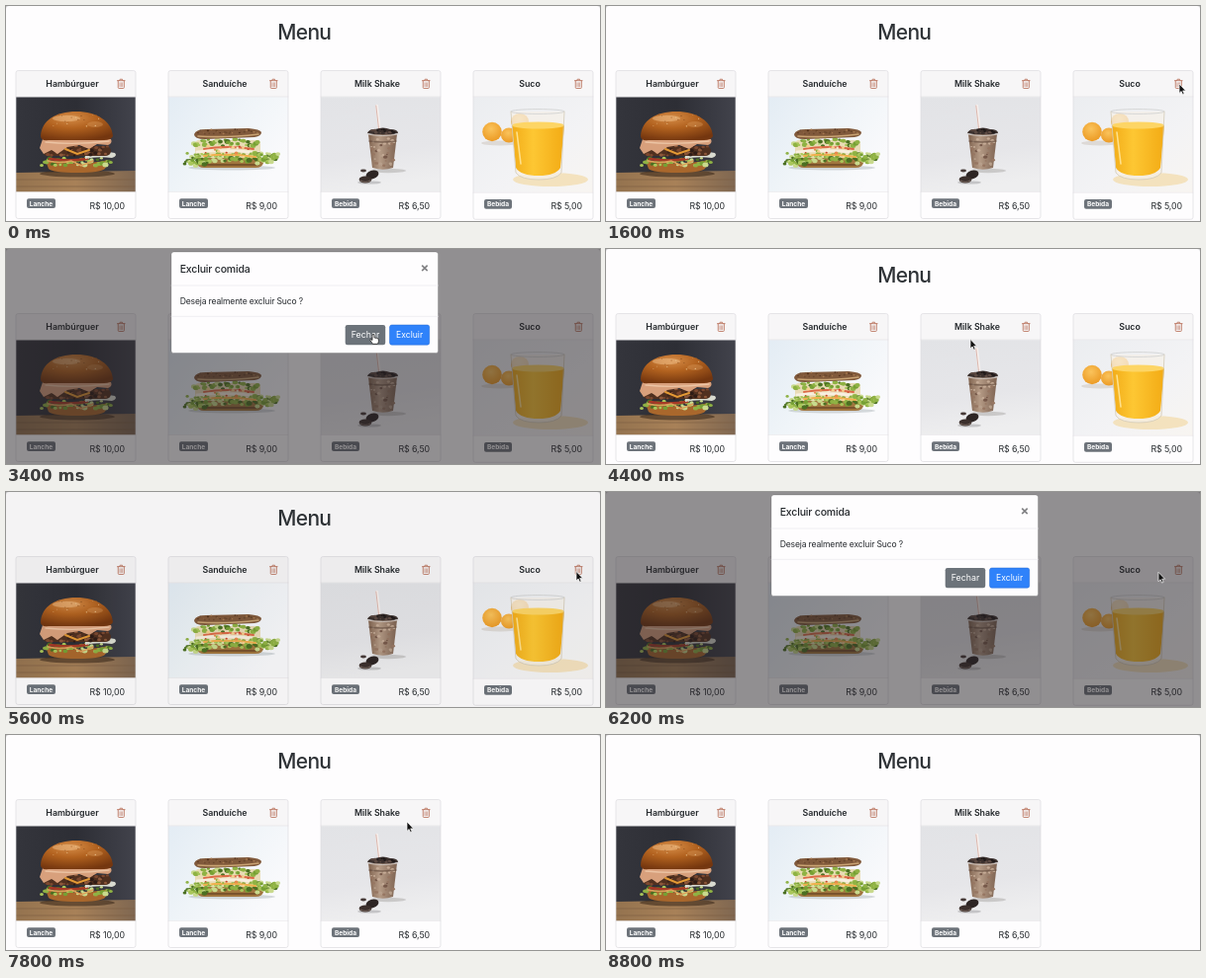
Write an HTML page that moves like this. It is 600 px wide and 218 px high and loops after 9000 ms.

```html
<!DOCTYPE html>
<html lang="pt">
<head>
<meta charset="utf-8">
<title>Menu</title>
<style>
html, body { margin: 0; width: 100%; height: 100%; overflow: hidden; background: #fefdfe; }
svg { display: block; }
#stage { width: 600px; height: 218px; font-family: Inter, "Open Sans", sans-serif; }
</style>
</head>
<body>
<svg id="stage" viewBox="0 0 600 218">
  <defs>
    <filter id="soft" x="-5%" y="-5%" width="110%" height="110%"><feGaussianBlur stdDeviation=".65"/></filter>
    <linearGradient id="wall" x2="1"><stop stop-color="#34353c"/><stop offset=".5" stop-color="#2d2e35"/><stop offset="1" stop-color="#42434c"/></linearGradient>
    <linearGradient id="wood" x2="1"><stop stop-color="#94734f"/><stop offset=".5" stop-color="#a88158"/><stop offset="1" stop-color="#7f6751"/></linearGradient>
    <radialGradient id="bun" cx=".42" cy=".22" r=".8"><stop stop-color="#d58c48"/><stop offset=".45" stop-color="#b2621f"/><stop offset="1" stop-color="#74360f"/></radialGradient>
    <linearGradient id="sky" x2="1" y2=".6"><stop stop-color="#e3ecf4"/><stop offset=".5" stop-color="#eff4f8"/><stop offset="1" stop-color="#fafafc"/></linearGradient>
    <linearGradient id="grey" y2="1" x2=".2"><stop stop-color="#e2e3e6"/><stop offset=".65" stop-color="#e6e6e9"/><stop offset="1" stop-color="#eeeeef"/></linearGradient>
    <linearGradient id="shake" x2="1"><stop stop-color="#80634f"/><stop offset=".4" stop-color="#b49a85"/><stop offset="1" stop-color="#7d6251"/></linearGradient>
    <linearGradient id="pale" y2="1"><stop stop-color="#ebedf0"/><stop offset=".6" stop-color="#f3f3f5"/><stop offset="1" stop-color="#f8f5f1"/></linearGradient>
    <linearGradient id="juice" x2="1"><stop stop-color="#f2ac18"/><stop offset=".4" stop-color="#fdc733"/><stop offset="1" stop-color="#f3ab15"/></linearGradient>
    <radialGradient id="orange" cx=".45" cy=".35" r=".75"><stop stop-color="#fac35c"/><stop offset="1" stop-color="#ea951c"/></radialGradient>
  </defs>
  <rect width="600" height="218" fill="#fefdfe"/>
  <path d="M0 0H3Q0 0 0 3ZM600 0H597Q600 0 600 3Z" fill="#c9c9cc"/>
  <g id="page"></g>
  <rect id="shade" width="600" height="218" fill="#262226"/>
  <g id="modal"></g>
  <g id="cursor" stroke-linejoin="round">
    <path id="arrow" d="M0 0V9.4L2.1 7.5 3.6 10.8 5.1 10.1 3.7 6.9H6.6Z" fill="#111" stroke="#fff" stroke-width=".7"/>
    <path id="hand" d="M-1 .6Q0-.6 1 .6V3.6Q2 3 2.7 3.9 3.7 3.4 4.3 4.3 5.4 4 5.4 5.2V7.2Q5.2 8.6 4.4 9.8H-.6Q-1.6 8-3 6.2-3.4 4.8-2.2 5L-1 6Z" fill="#fff" stroke="#222" stroke-width=".8"/>
  </g>
</svg>
<script>
const $ = id => document.getElementById(id);
const LOOP = 9000;

let seed = 7;
const rnd = () => (seed = seed * 16807 % 2147483647) / 2147483647;

const shape = (d, fill, more = '') => `<path d="${d}" fill="${fill}" ${more}/>`;
const line = (d, color, width, more = '') =>
  shape(d, 'none', `stroke="${color}" stroke-width="${width}" stroke-linecap="round" ${more}`);
const rect = (x, y, w, h, fill, more = '') =>
  `<rect x="${x}" y="${y}" width="${w}" height="${h}" fill="${fill}" ${more}/>`;
const oval = (x, y, rx, ry, fill, more = '') =>
  `<ellipse cx="${x}" cy="${y}" rx="${rx}" ry="${ry}" fill="${fill}" ${more}/>`;
const text = (s, x, y, size, fill, more = '') =>
  `<text x="${x}" y="${y}" font-size="${size}" fill="${fill}" ${more}>${s}</text>`;

// Scattered soft crumbs or leaves inside a box
function bits(n, x, y, w, h, r, colors) {
  let out = '';
  for (let i = 0; i < n; i++) {
    const px = x + w * (i + rnd()) / n, py = y + h * rnd(), k = r * (.6 + rnd() * .7);
    const color = colors[Math.floor(rnd() * colors.length)];
    out += oval(px.toFixed(1), py.toFixed(1), (k * 1.25).toFixed(1), k.toFixed(1), color);
  }
  return out;
}

const greens = ['#76a034', '#a9c65a', '#4b6f22', '#8fb244', '#c8d98c'];

const burger = () =>
  rect(10, 92, 122, 98, 'url(#wall)') +
  shape('M10 169 131 167V190H10Z', 'url(#wood)') +
  line('M10 176H131M10 183H131', '#7a5d42', .6) +
  oval(72, 170, 38, 3.5, '#3d2a1c', 'opacity=".6"') +
  shape('M40 157Q70 163 104 156L100 165Q95 169 72 169 47 169 43 165Z', '#a9672c') +
  bits(40, 36, 154, 70, 8, 1.9, greens) +
  line('M44 155Q62 158 82 155', '#a83a26', 2.6) +
  shape('M80 150Q96 146 110 149 113 152 107 154 92 152 80 155Z', '#d9dbd0') +
  rect(37, 142, 69, 10, '#50301f', 'rx="5"') +
  bits(40, 38, 141, 66, 11, 1.4, ['#7d4930', '#38211a', '#8d583a', '#2f1c16']) +
  shape('M37 135H106Q108 139 103 141L92 140 84 145 74 141 62 143 52 150 46 146 38 150 34 144Z', '#d8a07c') +
  line('M40 138Q70 141 104 137', '#ecc4a4', 1.3) +
  line('M60 145 72 150 84 146', '#e49a35', 2) +
  line('M42 157Q56 160 66 157L76 162 88 157', '#dca05a', 1.5) +
  shape('M35 132C36 116 50 107 71 107S107 117 108 132Q106 136 99 136H43Q35 137 35 132Z', 'url(#bun)') +
  oval(61, 114, 14, 3.2, '#f0c08a', 'opacity=".5"') +
  oval(90, 120, 8, 3, '#d99a5c', 'opacity=".4"') +
  bits(18, 46, 110, 50, 13, .5, ['#e8bd87', '#9c5a24']);

const sandwich = () =>
  rect(163, 92, 122, 98, 'url(#sky)') +
  oval(228, 164, 44, 2.5, '#b7bdc2', 'opacity=".55"') +
  shape('M192 154H258L260 159Q259 164 252 164H200Q194 164 192 159Z', '#a1763f') +
  line('M198 161H255', '#6e4826', 1.5) +
  rect(191, 136, 66, 18, '#e9dcb6', 'rx="4"') +
  bits(54, 183, 149, 90, 10, 1.9, greens) +
  bits(34, 189, 135, 66, 7, 1.8, greens) +
  line('M200 145Q222 141 250 145', '#dc6a48', 1.9) +
  line('M193 148Q222 145 256 149', '#f8efe0', 2.8) +
  line('M200 152Q226 149 252 153', '#f0b04e', 2) +
  bits(26, 198, 142, 54, 12, 1.2, ['#e78a4d', '#f7ead2', '#c8432b', '#f5d08c', '#8fb244']) +
  bits(20, 180, 153, 24, 9, 1.8, greens) +
  bits(22, 250, 149, 25, 11, 1.8, greens) +
  shape('M190 130Q192 125 202 125L245 124Q257 125 258 128 258 132 251 133L201 135Q190 135 190 130Z', '#80593b') +
  line('M194 132Q222 134 255 130', '#c8a272', 1.6) +
  bits(28, 194, 125, 60, 5, .7, ['#54351f', '#a77b50', '#69482d']);

const shake = () =>
  rect(317, 92, 122, 98, 'url(#grey)') +
  oval(386, 167, 18, 2.2, '#a9a7a6', 'opacity=".5"') +
  line('M374.5 101 377.5 127', '#f7f1ee', 2.6) +
  line('M373.8 101 376.8 127', '#d6a79c', .8) +
  shape('M366 130H395L391 164Q381 167.5 370 164Z', 'url(#shake)') +
  bits(34, 369, 134, 23, 28, 1.3, ['#77594a', '#c5ab96', '#967662', '#b8a08c']) +
  line('M367 137Q381 139 394 137', '#5f473a', 1.4, 'opacity=".6"') +
  shape('M365 129Q366 125 373 125 381 122 388 125 396 125 396 129 381 132 365 129Z', '#3b302d') +
  bits(14, 368, 125, 25, 4, 1.1, ['#201a1a', '#5d4a43']) +
  line('M365 130Q381 133 396 130', '#d3cac4', .9) +
  oval(367, 179, 12, 1.6, '#9b9b9d', 'opacity=".5"') +
  oval(370, 171, 6.6, 4.2, '#2d2524', 'transform="rotate(-18 370 171)"') +
  oval(363, 176, 6.4, 3.4, '#3c302d') +
  oval(361, 167, 3, 1.4, '#463936') +
  line('M358 177Q363 180 368 177', '#89786d', .8);

const juice = () =>
  rect(471, 92, 122, 99, 'url(#pale)') +
  oval(499, 139, 19, 2.6, '#d6d1cb', 'opacity=".7"') +
  oval(519, 117, 9, 8, 'url(#orange)') +
  oval(508, 131, 8, 7.5, 'url(#orange)') +
  oval(491, 127.5, 9.8, 9.7, 'url(#orange)') +
  oval(550, 176, 38, 7, '#f3dcac', 'opacity=".75"') +
  shape('M510 107H564L561 169Q556 176 538 176 520 176 515 169Z', '#f6f1e8', 'opacity=".75"') +
  shape('M511 121H564L560 164Q555 172 538 172 520 172 515 164Z', 'url(#juice)') +
  oval(537.5, 121, 26.3, 3.6, '#fdd565') +
  line('M516 128 520 160', '#ffe08a', 1.6) +
  oval(537, 107, 27, 2.4, 'none', 'stroke="#cfd0d0" stroke-width=".8"') +
  line('M510 107 515 169Q520 176 538 176T561 169L564 107', '#d3cbb6', .8);

const trash = (x, y) => `<g transform="translate(${x} ${y}) scale(.95)" fill="none" stroke="#b9705a" stroke-width=".9" stroke-linecap="round">
  <path d="M-4-3.3H4M-1.7-3.5-1.2-4.8H1.2L1.7-3.5M-3.2-3V4Q-3.2 4.9-2.3 4.9H2.3Q3.2 4.9 3.2 4V-3"/>
  <path d="M-1.4-1V3M0-1V3M1.4-1V3" stroke-width=".6"/></g>`;

function card(x, name, tag, price, draw, drop = 0) {
  const bottom = 188.5 + drop;
  return `<g id="card${x}">` +
    rect(x, 65.5, 121, 150 + drop, '#fefdfe', 'rx="2.2"') +
    shape(`M${x} 92V67.7Q${x} 65.5 ${x + 2.2} 65.5H${x + 118.8}Q${x + 121} 65.5 ${x + 121} 67.7V92Z`, '#f7f6f7') +
    `<svg x="${x}" y="92.3" width="121" height="${bottom - 92.3}" viewBox="${x} 92.3 121 ${bottom - 92.3}"><g filter="url(#soft)">${draw()}</g></svg>` +
    line(`M${x} 92H${x + 121}`, '#dedde0', .6) +
    line(`M${x} ${bottom}H${x + 121}`, '#e4e3e5', .5) +
    rect(x, 65.5, 121, 150 + drop, 'none', 'rx="2.2" stroke="#dddce0" stroke-width=".7"') +
    text(name, x + 57, 82, 8.8, '#24282c', 'font-weight="600" text-anchor="middle"') +
    trash(x + 106.3, 78.8) +
    rect(x + 11, 195.3 + drop, tag === 'Lanche' ? 29 : 28, 9.6, '#6d737a', 'rx="2"') +
    text(tag, x + (tag === 'Lanche' ? 25.5 : 25), 202.5 + drop, 6.6, '#fff', 'font-weight="700" text-anchor="middle"') +
    text(price, x + 110, 205.5 + drop, 8.8, '#24282c', 'text-anchor="end" letter-spacing="-.08"') + '</g>';
}

$('page').innerHTML =
  text('Menu', 301.3, 34.2, 21, '#2e3236', 'font-weight="500" text-anchor="middle" letter-spacing="-.7"') +
  card(10, 'Hambúrguer', 'Lanche', 'R$ 10,00', burger) +
  card(164, 'Sanduíche', 'Lanche', 'R$ 9,00', sandwich) +
  card(318, 'Milk Shake', 'Bebida', 'R$ 6,50', shake) +
  card(472, 'Suco', 'Bebida', 'R$ 5,00', juice, .8);

$('modal').innerHTML =
  rect(167, 3, 269.5, 102.5, '#fefdfe', 'rx="2.6" stroke="#000" stroke-opacity=".25" stroke-width=".6"') +
  line('M167 37H436.5M167 68.3H436.5', '#e4e5e8', .6) +
  text('Excluir comida', 175.7, 23.8, 10.5, '#24282c', 'font-weight="500" letter-spacing="-.17"') +
  text('×', 423, 23.8, 13, '#808083', 'font-weight="700" text-anchor="middle"') +
  text('Deseja realmente excluir Suco ?', 175.7, 55.6, 8.6, '#24282c', 'letter-spacing="-.17"') +
  rect(342.7, 77, 40.5, 20.2, '#6c737a', 'rx="2.2"') +
  text('Fechar', 363, 90.3, 8.8, '#fff', 'text-anchor="middle"') +
  rect(387.5, 77, 40.2, 20.2, '#2f82fa', 'rx="2.2" stroke="#2466cf" stroke-width=".5"') +
  text('Excluir', 407.6, 90.3, 8.6, '#fff', 'text-anchor="middle"');

const clamp = v => Math.max(0, Math.min(1, v));
const smooth = v => v * v * (3 - 2 * v);

// CSS ease-out: cubic-bezier(0, 0, .58, 1)
function easeOut(x) {
  let lo = 0, hi = 1, s = .5;
  for (let i = 0; i < 20; i++) {
    s = (lo + hi) / 2;
    if (1.74 * s * s * (1 - s) + s * s * s < x) lo = s; else hi = s;
  }
  return smooth(s);
}

const dialogs = [{ open: 2440, close: 3840 }, { open: 5588, close: 7268 }];
const DELETED = 7268, FADE = 150, SLIDE = 300, LIFT = 25.7;

const path = [
  [990, 532, 188], [1400, 579, 79], [2500, 579, 79], [3200, 371, 86.5], [3920, 371, 86.5],
  [4300, 368, 91.5], [4650, 368, 91.5], [5400, 576, 80.5], [6050, 576, 80.5],
  [6800, 405, 88], [8400, 405, 88], [8720, 388, 224]
];

function pointer(t) {
  const i = path.findIndex(p => p[0] > t);
  if (i < 1) return null;
  const [a, x, y] = path[i - 1], [b, u, v] = path[i], k = smooth((t - a) / (b - a));
  return [x + (u - x) * k, y + (v - y) * k];
}

function dialog(t) {
  const d = dialogs.find(d => t >= d.open && t < d.close + 2 * FADE);
  if (!d) return { dim: 0, alpha: 0, y: 0 };
  if (t < d.close) {
    const s = t - d.open - FADE;
    return { dim: clamp((t - d.open) / FADE), alpha: clamp(s / FADE), y: -LIFT * (1 - easeOut(clamp(s / SLIDE))) };
  }
  const s = t - d.close;
  return { dim: 1 - clamp((s - FADE) / FADE), alpha: 1 - clamp(s / FADE), y: -LIFT * easeOut(clamp(s / SLIDE)) };
}

const show = (el, on) => el.setAttribute('visibility', on ? 'visible' : 'hidden');

function render(t) {
  const { dim, alpha, y } = dialog(t), at = pointer(t);
  $('shade').setAttribute('opacity', dim * .5);
  $('modal').setAttribute('opacity', alpha);
  $('modal').setAttribute('transform', `translate(0 ${y})`);
  $('card472').setAttribute('display', t < DELETED ? 'inline' : 'none');
  const over = at && alpha > .5 && at[0] > 343 && at[0] < 428 && at[1] > 77 && at[1] < 97;
  show($('arrow'), at && !over);
  show($('hand'), over);
  if (at) $('cursor').setAttribute('transform', `translate(${at})`);
}

const start = performance.now();
function tick() {
  render((performance.now() - start) % LOOP);
  requestAnimationFrame(tick);
}
tick();
</script>
</body>
</html>
```
